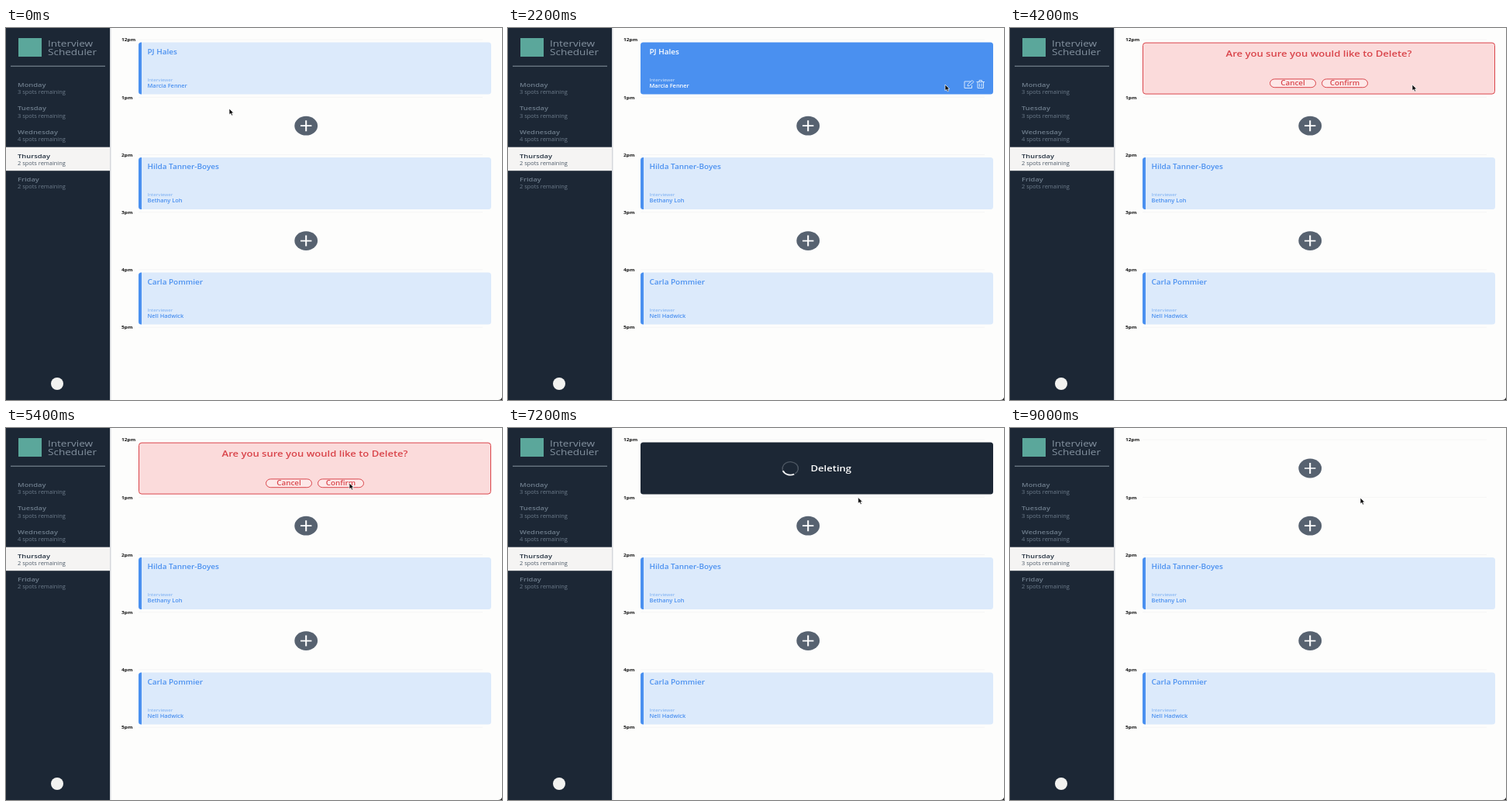
Animation of 640x480 px, one loop 9200 ms. Source, as an HTML page:

```html
<!DOCTYPE html>
<html lang="en">
<head>
<meta charset="utf-8">
<title>Interview Scheduler</title>
<style>
html, body { margin: 0; width: 100%; height: 100%; overflow: hidden; background: #fdfdfc; }
svg { display: block; width: 640px; height: 480px; font-family: "Open Sans", "Noto Sans", sans-serif; }
</style>
</head>
<body>
<svg id="stage" viewBox="0 0 640 480"></svg>
<script>
const LOOP = 9200, TICK = 100;
const HOVER = 1400, ASK = 3300, DELETE = 6300, DONE = 7300;
const ASPECT = 1.2; // the whole screen is shown wider than it was laid out
const PAPER = '#fdfdfc', NAVY = '#1c2735', WHITE = '#fff', BLUE = '#4a90f0', RED = '#d9444a';

const stage = document.getElementById('stage');
const days = [['Monday', 3], ['Tuesday', 3], ['Wednesday', 4], ['Thursday', 2], ['Friday', 2]];
const hours = ['12pm', '1pm', '2pm', '3pm', '4pm', '5pm'];
const bookings = {
  0: ['PJ Hales', 'Marcia Fenner'],
  2: ['Hilda Tanner-Boyes', 'Bethany Loh'],
  4: ['Carla Pommier', 'Nell Hadwick']
};

// Pointer stops: time, x, y
const pointerPath = [
  [0, 288, 104], [1000, 288, 104], [1300, 307, 81], [2200, 564, 73], [2900, 609, 72],
  [3700, 609, 72], [4200, 519, 73], [4900, 443, 71], [6300, 443, 71], [7300, 452, 90], [LOOP, 452, 90]
];

// Smooth speed through each stop, without overshooting it.
function speedAt(i, axis) {
  const slope = j => (pointerPath[j + 1][axis] - pointerPath[j][axis]) / (pointerPath[j + 1][0] - pointerPath[j][0]);
  if (i === 0 || i === pointerPath.length - 1) return 0;
  const before = slope(i - 1), after = slope(i);
  return before * after > 0 ? 2 * before * after / (before + after) : 0;
}

function pointerAt(t) {
  const next = pointerPath.findIndex(stop => stop[0] > t), last = next - 1;
  const from = pointerPath[last], to = pointerPath[next];
  const span = to[0] - from[0], u = (t - from[0]) / span, v = 1 - u;
  return [1, 2].map(axis =>
    from[axis] + (to[axis] - from[axis]) * u * u * (3 - 2 * u)
    + span * u * v * (speedAt(last, axis) * v - speedAt(next, axis) * u));
}

const at = (x, y) => `transform="translate(${x} ${y}) scale(${ASPECT} 1)"`;

const text = (x, y, size, fill, str, weight = 400, anchor = 'start') =>
  `<text ${at(x, y)} font-size="${size}" fill="${fill}" font-weight="${weight}" text-anchor="${anchor}">${str}</text>`;

const rect = (x, y, w, h, fill, extra = '') =>
  `<rect x="${x}" y="${y}" width="${w}" height="${h}" fill="${fill}" ${extra}/>`;

const path = (d, stroke, width) =>
  `<path d="${d}" fill="none" stroke="${stroke}" stroke-width="${width}"/>`;

const slotY = i => 18.6 + i * 74.2;

function sidebar(t) {
  let out = rect(0, 0, 134, 480, NAVY) + rect(134, 0, 1.5, 480, '#d5d8dc')
    + rect(16, 13, 30, 24, '#5ba79b')
    + text(54, 23.5, 11.3, '#8593a1', 'Interview')
    + text(54, 34.5, 11.3, '#8593a1', 'Scheduler')
    + rect(6, 48.7, 122, 1, '#8794a0');
  days.forEach(([name, spots], i) => {
    const y = 75.7 + i * 30.6, selected = name === 'Thursday';
    const count = selected && t >= DONE ? spots + 1 : spots;
    if (selected) out += rect(0, 153.7, 134, 30.5, '#f5f4f3');
    out += text(15, y, 7.8, selected ? '#222f3e' : '#6e7d8c', name, 600)
      + text(15, y + 9.2, 6.2, selected ? '#4d5a68' : '#6e7d8c', `${count} spots remaining`);
  });
  return out + '<circle cx="66" cy="459" r="8" fill="#f2f2f0"/>';
}

function addButton(y) {
  return `<g ${at(387.2, y + 33.4)}><circle r="12.4" fill="#576270"/>`
    + path('M-6 0H6M0-7V7', WHITE, 1.7) + '</g>';
}

function bookingCard(y, [student, interviewer], hovered) {
  const ink = hovered ? WHITE : BLUE;
  const label = hovered ? '#d3e6fc' : '#78adf2';
  let out = rect(171, y, 455, 67, hovered ? BLUE : '#dceafb', 'rx="3.5"');
  if (!hovered)
    out += `<path d="M175 ${y}H174.5Q171 ${y} 171 ${y + 3.5}V${y + 63.5}Q171 ${y + 67} 174.5 ${y + 67}H175Z" fill="${BLUE}"/>`;
  out += text(182.5, y + 15.2, 8.3, ink, student, 600)
    + text(182.5, y + 50.2, 5.2, label, 'Interviewer')
    + text(182.5, y + 58.2, 6.2, ink, interviewer, 600);
  if (hovered) {
    out += path('M597 69H589V77.5H598.5V74M593 75L593.5 72.5 599 67.5 601 69.5 595.5 74.5Z', '#d3e6fc', 1)
      + path('M604.5 69.5H615M608 69V67.5H611.5V69M606 70V77.5H613.5V70M608.3 71.5V76M611.2 71.5V76', '#d3e6fc', 1);
  }
  return out;
}

function confirmCard(y) {
  const button = (x, label) =>
    rect(x, y + 47.3, 59, 10.8, '#fde8e8', `rx="6" ry="5.4" stroke="${RED}"`)
    + text(x + 29.5, y + 55.6, 8.2, RED, label, 600, 'middle');
  return rect(171.5, y + .5, 454, 66, '#fbdbdb', `rx="3.5" stroke="${RED}"`)
    + text(398.5, y + 18.7, 10.9, RED, 'Are you sure you would like to Delete?', 600, 'middle')
    + button(335.5, 'Cancel') + button(402.5, 'Confirm');
}

function deletingCard(y, t) {
  const angle = (t - DELETE) * .36;
  return rect(171, y, 455, 67, NAVY, 'rx="3.5"')
    + `<g ${at(364.3, y + 33.6)}><g transform="rotate(${angle})">`
    + path('M-8.5 0A8.5 8.5 0 1 1 0 8.5', '#4d5763', 1.2)
    + path('M-8.2-2.2A8.5 8.5 0 0 0-1 8.4', '#f2f3f4', 1.8) + '</g></g>'
    + text(390.5, y + 37.4, 10.9, WHITE, 'Deleting', 600);
}

function slot(i, t) {
  const y = slotY(i);
  if (!bookings[i] || (i === 0 && t >= DONE)) return addButton(y);
  if (i === 0 && t >= DELETE) return deletingCard(y, t);
  if (i === 0 && t >= ASK) return confirmCard(y);
  return bookingCard(y, bookings[i], i === 0 && t >= HOVER);
}

function schedule(t) {
  return hours.map((hour, i) => {
    const y = slotY(i);
    return text(149, y - 1.2, 5.5, '#111', hour, 700)
      + rect(171, y - 4, 444, 1, '#f5f5f5')
      + (i < 5 ? slot(i, t) : '');
  }).join('');
}

function pointer(t) {
  const [x, y] = pointerAt(t);
  return `<path transform="translate(${x} ${y})" d="M0 0V7.8L1.8 6.3 3.2 9 4.6 8.4 3.4 5.8H5.8Z" fill="#0a0a0a" stroke="#fff" stroke-width=".7"/>`;
}

let shown = -1;
function frame(now) {
  const t = Math.floor(now % LOOP / TICK) * TICK;
  if (t !== shown) {
    shown = t;
    stage.innerHTML = rect(0, 0, 640, 480, PAPER) + sidebar(t) + schedule(t)
      + '<path d="M640 476.5V480H635Q639 480 640 476.5Z" fill="#222"/>' + pointer(t);
  }
  requestAnimationFrame(frame);
}
frame(performance.now());
</script>
</body>
</html>
```
